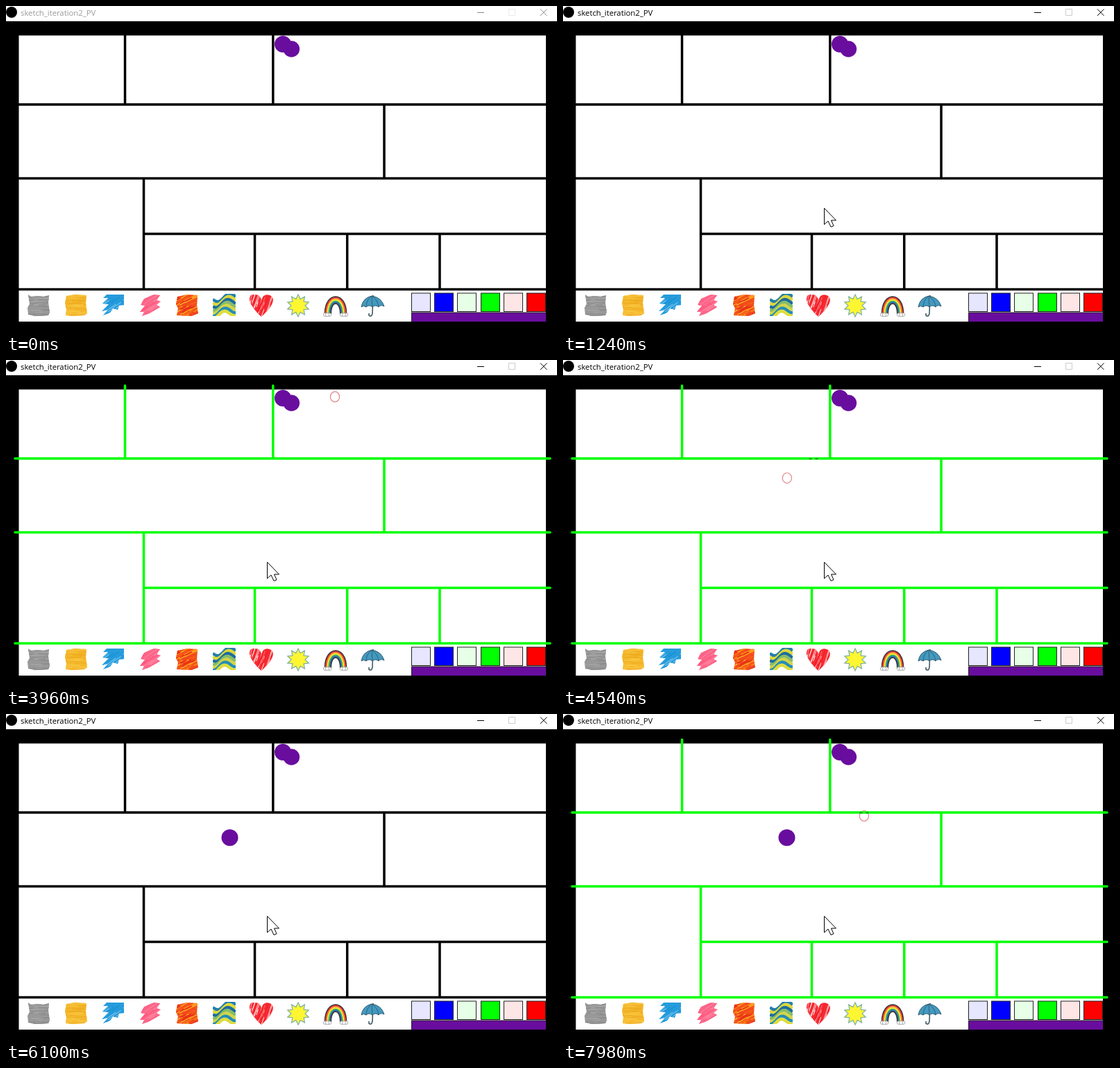
Recreate the animation shown at these times as an HTML page with a canvas. Size 794 px wide and 470 px high, loop 8000 ms.

```html
<!DOCTYPE html>
<html lang="en">
<head>
<meta charset="utf-8">
<title>Sketch window</title>
<style>
  html, body { margin: 0; width: 100%; height: 100%; overflow: hidden; background: #000; }
  canvas { display: block; }
</style>
</head>
<body>
<canvas id="stage" width="794" height="470"></canvas>
<script>
const LOOP = 8000;
const PURPLE = '#690d9e';
const screen = document.getElementById('stage').getContext('2d');
const toolbar = document.createElement('canvas');
toolbar.width = 794;
toolbar.height = 470;
let g = toolbar.getContext('2d');

let seed = 7;
const random = () => (seed = (seed * 16807) % 2147483647) / 2147483647;

function shape(d, fill, stroke, width = 1) {
  const path = new Path2D(d);
  if (fill) { g.fillStyle = fill; g.fill(path); }
  if (stroke) { g.strokeStyle = stroke; g.lineWidth = width; g.stroke(path); }
}

function ellipse(x, y, rx, ry, fill, stroke, width = 1) {
  g.beginPath();
  g.ellipse(x, y, rx, ry, 0, 0, Math.PI * 2);
  if (fill) { g.fillStyle = fill; g.fill(); }
  if (stroke) { g.strokeStyle = stroke; g.lineWidth = width; g.stroke(); }
}

// A filled outline textured with random streaks of paint.
function paint(d, base, colors, count, angle, width = 1.2) {
  const path = new Path2D(d);
  g.save();
  g.fillStyle = base;
  g.fill(path);
  g.clip(path);
  const cx = +d.match(/\d+/)[0];
  g.lineWidth = width;
  for (let i = 0; i < count; i++) {
    const x = cx - 32 + random() * 64, y = 414 + random() * 35;
    const reach = 4 + random() * 8;
    const dx = Math.cos(angle) * reach, dy = Math.sin(angle) * reach;
    g.strokeStyle = colors[i % colors.length];
    g.beginPath();
    g.moveTo(x - dx, y - dy);
    g.quadraticCurveTo(x, y + random() * 3 - 1.5, x + dx, y + dy);
    g.stroke();
  }
  g.restore();
}

function drawBrushes() {
  paint('M32 416L36 419 45 418 54 419 62 417 61 428 63 441 61 446 43 447 32 445 31 435 34 430Z',
    '#999', ['#8a8a8a', '#a6a6a6', '#929292'], 90, 0);
  paint('M87 418L100 416 116 417 115 429 117 443 113 446 97 447 86 446 87 437 85 429Z',
    '#f5b92c', ['#f8c640', '#eeac20', '#f4b631'], 80, 0);
  paint('M145 416L170 416 170 431 163 432 161 438 154 436 150 442 140 446 147 438 138 440 148 430 139 429 147 421 140 421Z',
    '#259bdc', ['#2f9fdd', '#168fd3', '#72c1e9'], 45, -0.65);
  paint('M199 422L213 416 222 417 217 424 223 426 217 431 222 434 207 443 196 447 199 441 193 441 200 432 194 431Z',
    '#ff6387', ['#ff587e', '#ff83a0', '#f86b8b'], 65, -0.6);
  paint('M247 419L261 416 276 417 275 431 277 443 267 447 246 446 248 436 245 430Z',
    '#f14a1c', ['#e72c18', '#ff9819', '#f85d16', '#fbaa25'], 85, -0.45, 1.7);
  drawWaves();
  paint('M368 448C350 432 346 416 357 416Q366 415 368 424Q371 414 380 417C390 421 384 434 368 448',
    '#f52b32', ['#fff', '#ff7277', '#f31822', '#ffb0b2'], 95, 1.9, 0.9);
}

function drawWaves() {
  const colors = ['#247fab', '#dcd83a', '#1f6c9d', '#86bd67', '#d2d548', '#268db6', '#dedd3d'];
  g.save();
  g.beginPath();
  g.rect(298, 415, 33, 32);
  g.clip();
  g.lineWidth = 4.5;
  colors.forEach((color, row) => {
    g.strokeStyle = color;
    g.beginPath();
    for (let x = 298; x <= 331; x++) {
      g.lineTo(x, 423 + row * 4 - (x - 298) * 0.16 + 4.5 * Math.sin((x - 298) / 5 + row * 0.25));
    }
    g.stroke();
  });
  g.restore();
}

function drawSun() {
  g.beginPath();
  for (let i = 0; i < 20; i++) {
    const angle = i * Math.PI / 10 - Math.PI / 2;
    const radius = i % 2 ? 10 : 16;
    g.lineTo(421 + radius * Math.cos(angle), 432 + radius * Math.sin(angle));
  }
  g.closePath();
  g.fillStyle = '#fff632';
  g.fill();
  g.strokeStyle = '#84b5a1';
  g.lineWidth = 1.3;
  g.stroke();
}

function drawRainbow() {
  ['#333', '#ed2730', '#f99b25', '#f7e92f', '#35b64b', '#2466c5', '#333'].forEach((color, i) => {
    const r = 15.5 - i * 1.45;
    shape(`M${475 - r} 444C${475 - r} ${434 - r * 1.5} ${475 + r} ${434 - r * 1.5} ${475 + r} 444`,
      null, color, 1.7);
  });
  for (const x of [463, 487]) {
    for (const dx of [-3, 3, 0]) ellipse(x + dx, 445, 2.8, 2.5, '#fff', '#777', 0.6);
  }
}

function drawUmbrella() {
  shape('M529 417L528 443Q527 449 523 446L523 443', null, '#455b66', 1.6);
  shape('M512 434Q514 421 527 418Q541 420 545 433Q540 430 537 434Q532 430 528 434Q523 430 519 434Q515 431 512 434Z',
    '#4399bf', '#315d71', 1);
  shape('M527 418Q519 424 519 434M527 418L528 434M527 418Q536 424 537 434', null, '#315d71', 0.9);
}

function drawSwatches() {
  g.save();
  g.beginPath();
  g.rect(584, 412, 194, 43);
  g.clip();
  g.strokeStyle = '#222';
  g.lineWidth = 1;
  ['#e6e6ff', '#00f', '#e6ffe6', '#0f0', '#ffe6e6', '#f00'].forEach((color, i) => {
    const x = Math.round(584.7 + i * 33.3) - 0.5;
    g.fillStyle = color;
    g.fillRect(x, 414, 27, 26.5);
    g.strokeRect(x, 414, 27, 26.5);
  });
  g.fillStyle = PURPLE;
  g.fillRect(584.5, 442, 200, 20);
  g.strokeRect(584.5, 442, 200, 20);
  g.restore();
}

function drawWindow(active) {
  g.fillStyle = '#fff';
  g.fillRect(0, 0, 794, 22);
  ellipse(8, 9, 8, 8, '#000');
  g.fillStyle = active ? '#000' : '#999';
  g.font = '11.3px "Open Sans", "Noto Sans", sans-serif';
  g.fillText('sketch_iteration2_PV', 21, 14);
  const ink = active ? '#000' : '#888';
  shape('M679 9.5H689', null, ink);
  shape('M724.5 4.5H733.5V13.5H724.5Z', null, active ? '#ccc' : '#e8e8e8');
  shape('M770 4.5L779.5 14M779.5 4.5L770 14', null, ink);

  g.fillStyle = '#000';
  g.fillRect(0, 22, 794, 448);
  g.fillStyle = '#fff';
  g.fillRect(18.5, 42.5, 759.5, 412.5);
}

function drawGrid(color) {
  g.lineCap = 'round';
  shape('M13 142H784M13 248.5H784M198.5 328.5H784M13 408.5H784' +
    'M171.5 37V142M384.8 37V142M545 142V248.5M198.5 248.5V408.5' +
    'M358.5 328.5V408.5M491.7 328.5V408.5M625 328.5V408.5', null, color, 3.5);
  g.lineCap = 'butt';
}

// Position on a keyed path of [time, x, y].
function along(keys, t) {
  const next = keys.findIndex(key => key[0] > t);
  if (next < 0) return keys[keys.length - 1].slice(1);
  const [t0, x0, y0] = keys[next - 1], [t1, x1, y1] = keys[next];
  const k = (t - t0) / (t1 - t0);
  return [x0 + (x1 - x0) * k, y0 + (y1 - y0) * k];
}

const stepped = (t, start, step) => start + Math.floor((t - start) / step) * step;

const pointerPath = [[70, 470, 426], [470, 564, 383], [650, 564, 383], [715, 580, 329],
  [780, 591, 350], [1009, 591, 350], [1010, 120, 432], [1238, 376, 291]];
const ringIn = [[3960, 474, 53], [4510, 323, 170], [4590, 316, 177], [4669, 322, 173]];
const ringOut = [[7500, 322, 173], [7980, 434, 147]];

function drawPointer(t) {
  const time = t < 1010 ? stepped(t, 70, 65) : stepped(t, 1010, 76.5);
  const [x, y] = along(pointerPath, time);
  g.save();
  g.translate(Math.round(x) + 0.5, Math.round(y) + 0.5);
  shape('M0 0V23.5L5.5 18.5 9.5 27 13.5 25.3 10 17.5H17Z', '#fff', '#000');
  g.restore();
}

function lineTicks(x) {
  shape(`M${x - 6.5} 142.5h4M${x + 2.5} 142.5h4`, null, '#174d17', 1.2);
}

function drawRing(t) {
  let position;
  if (t >= 3960 && t < 4770) position = along(ringIn, stepped(t, 3960, 78.8));
  else if (t >= 7580) position = along(ringOut, stepped(t, 7580, 79.9));
  else if (t >= 6490) position = [322, 173];
  if (t >= 4360 && t < 4770) lineTicks(361);
  if (!position) return;

  const [x, y] = position;
  ellipse(x, y, 6.6, 7.4, '#fff', '#e18787', 1.2);
  if (Math.abs(y - 142) < 7) {
    shape(`M${x - 6} 142h12`, null, '#0f0', 3.5);
    lineTicks(x);
  }
}

function drawScene(t) {
  drawWindow(t >= 70);
  const green = (t >= 2340 && t < 4770) || t >= 6490;
  drawGrid(green ? '#0f0' : '#000');
  g.drawImage(toolbar, 0, 0);
  ellipse(399, 55, 12, 12, PURPLE);
  ellipse(411.3, 62, 11.8, 11.8, PURPLE);
  if (t >= 4770) ellipse(322.5, 178.3, 12, 12, PURPLE);
  drawRing(t);
  if (t >= 70) drawPointer(t);
}

drawBrushes();
drawSun();
drawRainbow();
drawUmbrella();
drawSwatches();
g = screen;

const begin = performance.now();
function frame() {
  drawScene((performance.now() - begin) % LOOP);
  requestAnimationFrame(frame);
}
frame();
</script>
</body>
</html>
```
